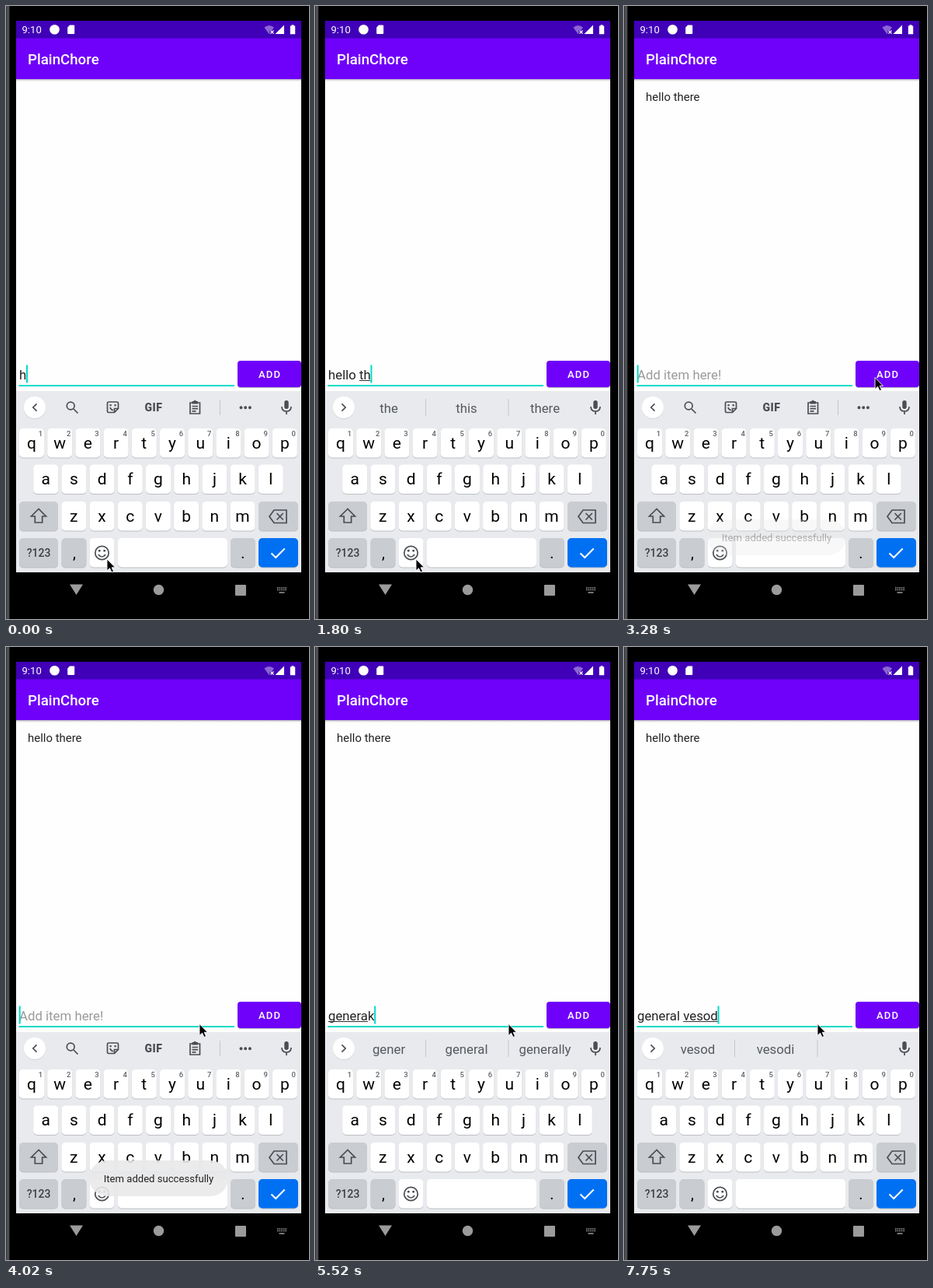
Recreate the animation shown at these times as an HTML page. Size 390 px wide and 788 px high, loop 8000 ms.

```html
<!DOCTYPE html>
<html lang="en">
<head>
<meta charset="utf-8">
<title>To-do app demo</title>
<style>
html, body { margin: 0; width: 100%; height: 100%; overflow: hidden; background: #000; }
svg { display: block; font-family: Roboto, sans-serif; }
text { white-space: pre; }
.line { fill: none; stroke: #4a4d52; stroke-width: 1.7; }
.mid { text-anchor: middle; }
.word { font-size: 16.8px; fill: #55585d; text-anchor: middle; }
</style>
</head>
<body>
<svg width="390" height="788" viewBox="0 0 390 788">
  <defs>
    <linearGradient id="edge">
      <stop offset="0" stop-color="#303336"/><stop offset=".6" stop-color="#5c6064"/><stop offset="1" stop-color="#08080a"/>
    </linearGradient>
    <linearGradient id="shade" x2="0" y2="1">
      <stop stop-color="#bbb"/><stop offset="1" stop-color="#fefefe"/>
    </linearGradient>
  </defs>
  <rect width="390" height="788"/>
  <rect width="5" height="788" fill="url(#edge)"/>

  <!-- status bar and title -->
  <rect x="13" y="19" width="367" height="23" fill="#4000b8"/>
  <rect x="13" y="41.5" width="367" height="52.5" fill="#6f00fa"/>
  <g fill="#fff">
    <text x="20.5" y="35" font-size="13.1">9:10</text>
    <circle cx="62.5" cy="30.3" r="6.3"/>
    <path d="M82 24.5h5.2q1 0 1 1v9.6q0 1-1 1h-7q-1 0-1-1v-7.6z"/>
    <path d="M332.5 27.5q6-5 12.5 0l-2.5 3.5h-3v4l-1 1z" opacity=".4"/>
    <path d="M340.5 31.5l4 4m0-4l-4 4" stroke="#fff" stroke-width="1.1"/>
    <path d="M358 24.5v11.5h-11.5z"/>
    <path d="M367.5 25.5v-1.3h3v1.3h1.7v10.7h-6.4v-10.7z"/>
    <text x="28" y="75" font-size="18.7" font-weight="500">PlainChore</text>
  </g>

  <!-- list and input -->
  <rect x="13" y="94" width="367" height="402" fill="#fefefe"/>
  <rect x="13" y="94" width="367" height="3" fill="url(#shade)"/>
  <text id="item" x="28" y="122" font-size="14.95" fill="#222">hello there</text>
  <text id="input" x="17" y="479.5" font-size="16.8"></text>
  <rect id="under" x="17" y="481" height="1" fill="#333"/>
  <rect x="16.5" y="487" width="277.5" height="2" fill="#00dbc6"/>
  <rect id="caret" y="461.5" width="2" height="23" fill="#00dbc6"/>
  <rect x="298" y="457" width="82" height="34" rx="4" fill="#bbb"/>
  <rect x="298" y="456" width="82" height="34" rx="4" fill="#6f00fa"/>
  <rect id="ripple" x="298" y="456" width="82" height="34" rx="4" fill="#fff" opacity=".2"/>
  <text x="325" y="478" font-size="13.1" font-weight="500" letter-spacing="1.15" fill="#fff">ADD</text>

  <!-- keyboard -->
  <rect x="13" y="495" width="367" height="233" fill="#e8eaed"/>
  <circle cx="37" cy="517" r="14" fill="#d2d4d7"/>
  <circle cx="37" cy="516" r="14" fill="#fff"/>
  <path id="chevron" class="line" d="M2.5-4.7L-2.2 0 2.5 4.7"/>
  <g fill="#4a4d52">
    <rect x="358.3" y="507" width="5.4" height="11" rx="2.7"/>
    <path class="line" d="M355 515q0 6 6 6t6-6m-6 6v4"/>
  </g>
  <g id="tools">
    <circle class="line" cx="83.2" cy="514" r="4.9"/>
    <path class="line" d="M87 518l5.5 5.5" stroke-width="2.1"/>
    <path class="line" d="M132 509h11q1.5 0 1.5 1.5v7l-5 5h-7.5q-1.500 0-1.5-1.500v-10.500q0-1.500 1.500-1.500zM144 517.500h-4.500v4.500M134 516q1 3.500 4 3.500"/>
    <path d="M133.500 512h2.200v2.200h-2.200zM139.500 512h2.200v2.200h-2.200z" fill="#4a4d52"/>
    <text class="mid" x="190" y="521" font-size="14" font-weight="900" letter-spacing=".5" fill="#4a4d52">GIF</text>
    <path class="line" d="M237 510h12.500v14h-12.500zM239.500 514.500h7.500m-7.500 3.200h7.500m-7.500 3.200h5"/>
    <path d="M239.500 508h2q1.700-2.500 3.400 0h2v3.500h-7.400z" fill="#4a4d52"/>
    <path d="M275.500 506v20" stroke="#c4c7cb"/>
    <path d="M302.500 516.300h.01m5.700 0h.01m5.700 0h.01" stroke="#4a4d52" stroke-width="4" stroke-linecap="round"/>
  </g>
  <g id="words">
    <path d="M142.500 505v22M249 505v22" stroke="#c4c7cb"/>
    <text class="word" x="95" y="522.500"></text>
    <text class="word" x="195" y="522.500"></text>
    <text class="word" x="296" y="522.500"></text>
  </g>
  <g id="keys"></g>
  <g class="line">
    <path d="M42 646.500l-9.500 9.500h4.800v8h9.400v-8h4.800z"/>
    <path d="M345 648h16v16.500h-16l-6-8.200zM348.500 652l8.300 8.500m0-8.500l-8.300 8.500"/>
    <circle cx="123.500" cy="703" r="8.700"/>
    <path d="M118.800 705q4.700 6 9.400 0"/>
    <path d="M341.500 703.500l5.700 5.500 11.500-11.500" stroke="#fff" stroke-width="2"/>
  </g>
  <path d="M119 699h2.600v2.600h-2.600zM125.400 699h2.600v2.600h-2.600z" fill="#4a4d52"/>

  <!-- navigation bar -->
  <g fill="#9b9b9b">
    <path d="M82 743.500h17l-8.500 13.500z"/>
    <circle cx="196.500" cy="750.500" r="6.700"/>
    <rect x="295" y="744" width="14" height="14" rx="1"/>
    <path d="M349 748h12M349 750.500h12" stroke="#9b9b9b" stroke-width="1.700" stroke-dasharray="1.600 1"/>
    <path d="M351.500 754h7" stroke="#9b9b9b" stroke-width="1.500"/>
  </g>

  <g id="toast">
    <rect x="107" y="660" width="179" height="46" rx="23" fill="#e9e9ea" opacity=".89"/>
    <text class="mid" x="196.500" y="688" font-size="13.1" fill="#222">Item added successfully</text>
  </g>
  <path id="mouse" d="M0 0V15L3.500 11.700 6 17 8.500 16 6.200 10.800H10.500Z" stroke="#fff" stroke-width=".9"/>
</svg>
<script>
const $ = id => document.getElementById(id);
const LOOP = 8000, TICK = 148.88, PITCH = 36.2;

// Keyboard
let keys = '';
const label = (s, x, y, size, more = '') =>
  `<text class="mid" x="${x}" y="${y}" font-size="${size}" ${more}>${s}</text>`;
function key(x, y, w, fill = '#fff') {
  const box = `x="${x}" width="${w}" height="37.5" rx="5"`;
  keys += `<rect ${box} y="${y + 1}" fill="#bcbfc4"/><rect ${box} y="${y}" fill="${fill}"/>`;
}
[['qwertyuiop', 33, 543], ['asdfghjkl', 51.2, 589.5], ['zxcvbnm', 87.3, 637]].forEach(([row, x0, y], r) => {
  [...row].forEach((c, i) => {
    const x = x0 + i * PITCH;
    key(x - 16, y, 32);
    keys += label(c, x, y + 25.5, 21);
    if (!r) keys += label((i + 1) % 10, x + 11.5, y + 10, 9.5, 'fill="#5f6368" font-weight="500"');
  });
});
const GREY = '#c9ccd1';
key(17, 637, 50, GREY);
key(325, 637, 51, GREY);
key(17, 684, 50, GREY);
key(71.5, 684, 32, GREY);
key(107.5, 684, 32);
key(144, 684, 141);
key(289, 684, 32, GREY);
key(325, 684, 51, '#0070f3');
keys += label('?123', 42, 708, 14, 'fill="#3c4043" font-weight="500"')
  + label(',', 88, 710, 20) + label('.', 305, 710, 20);
$('keys').innerHTML = keys;

// [tick, typed text, underlined letters of the last word, suggestions ('' shows the toolbar)]
const steps = [
  [0, 'h', 0, ''],
  [1, 'he', 1, ''],
  [2, 'he', 2, 'he|hey|her'],
  [5, 'hel', 2, 'he|hey|her'],
  [6, 'hell', 3, 'hel|hello|help'],
  [7, 'hello', 4, "hell|hello|he'll"],
  [9, 'hello ', 0, "hell|hello|he'll"],
  [10, 'hello ', 0, 'and|I|there'],
  [11, 'hello t', 1, 'the|to|this'],
  [12, 'hello th', 2, 'the|this|there'],
  [14, 'hello the', 3, 'the|there|they'],
  [15, 'hello there', 4, 'there|the|then'],
  [16, 'hello there', 5, "there|there's|therefore"],
  [21, '', 0, ''],
  [32, 'g', 0, ''],
  [33, 'ge', 1, 'g|good|get'],
  [34, 'gen', 2, 'ge|get|getting'],
  [35, 'gene', 3, 'gen|general|gene'],
  [36, 'genera', 5, 'gene|general|gene'],
  [37, 'generak', 6, 'gener|general|generally'],
  [38, 'generak', 7, 'generak|general|generals'],
  [39, 'genera', 6, 'generak|general|generals'],
  [40, 'genera', 6, 'genera|general|generally'],
  [42, 'general', 6, 'genera|general|generally'],
  [43, 'general', 7, 'general|generally|generals'],
  [44, 'general ', 0, 'general|generally|generals'],
  [45, 'general ', 0, 'manager|vesodi|and'],
  [47, 'general v', 0, 'manager|vesodi|and'],
  [48, 'general ve', 1, 'v|very|vesodi'],
  [49, 'general ves', 2, 've|very|vesodi'],
  [50, 'general veso', 3, 'ves|vesodi|vest'],
  [51, 'general vesod', 4, 'veso|vesodi|'],
  [52, 'general vesod', 5, 'vesod|vesodi|']
];

const pen = document.createElement('canvas').getContext('2d');
const widthOf = s => { pen.font = '16.8px Roboto, sans-serif'; return pen.measureText(s).width; };
const show = (id, on) => $(id).style.display = on ? '' : 'none';
const ramp = (v, a, b) => Math.min(1, Math.max(0, (v - a) / (b - a)));
const ease = p => p * p * (3 - 2 * p);

function draw(tick) {
  const [, text, marked, words] = steps.findLast(s => s[0] <= tick);
  const start = text.lastIndexOf(' ') + 1;
  const left = widthOf(text.slice(0, start));

  $('input').textContent = text || 'Add item here!';
  $('input').setAttribute('fill', text ? '#222' : '#9a9a9a');
  $('under').setAttribute('x', 17 + left);
  $('under').setAttribute('width', widthOf(text.slice(start, start + marked)));
  $('caret').setAttribute('x', 16.7 + widthOf(text));
  const blink = tick >= 19 && tick < 21 || tick >= 24 && tick < 27 || tick >= 30 && tick < 32;
  show('caret', !blink);

  show('tools', !words);
  show('words', words);
  const parts = words.split('|');
  document.querySelectorAll('.word').forEach((w, i) => w.textContent = parts[i] || '');
  $('chevron').setAttribute('transform', `translate(37 516) scale(${words ? -1 : 1} 1)`);

  show('item', tick >= 21);
  show('ripple', tick === 20);
  $('toast').setAttribute('opacity', ramp(tick, 21, 24) * (1 - ramp(tick, 33, 36)));

  const go = ease(ramp(tick, 15, 19)), back = ease(ramp(tick, 22, 27));
  $('mouse').setAttribute('transform',
    `translate(${130 + 193 * go - 74 * back} ${711 - 233.5 * go + 7 * back})`);
}

function frame() {
  draw(Math.floor(performance.now() % LOOP / TICK));
  requestAnimationFrame(frame);
}
frame();
</script>
</body>
</html>
```
